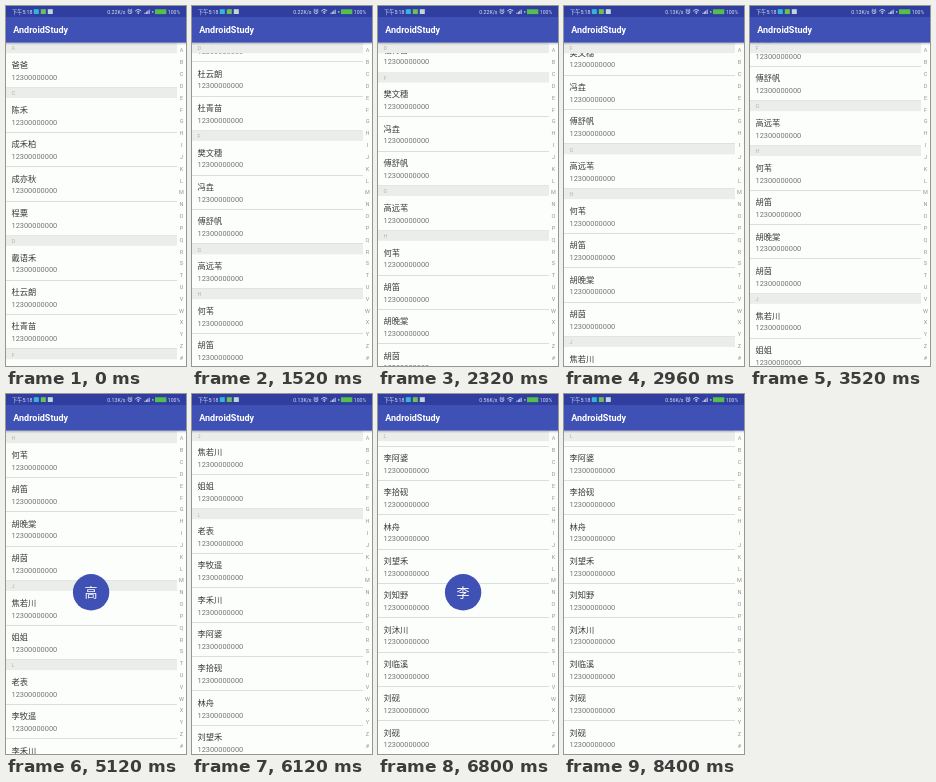
These frames come from a looping animation (180 px wide and 360 px high, 8.96 s). An HTML page with a canvas:

```html
<!DOCTYPE html>
<html lang="zh-CN">
<head>
<meta charset="utf-8">
<title>AndroidStudy</title>
<style>
html, body { margin: 0; width: 100%; height: 100%; overflow: hidden; background: #fcfefb; }
canvas { display: block; width: 180px; height: 360px; }
</style>
</head>
<body>
<canvas id="stage"></canvas>
<script>
const W = 180, H = 360, LOOP = 8960, STEP = 40;
const STATUS_H = 11, TOP = 36.67, LIST_W = 171;
const ROW_H = 34.333, HEAD_H = 10.5;
const FONT = 'Roboto, "Noto Sans CJK SC", "Noto Sans CJK", sans-serif';
const PHONE = '12300000000';
const BLUE = '#3f51b5', PAPER = '#fcfefb';

const GROUPS = {
  A: '爸爸',
  C: '陈禾 成禾柏 成亦秋 程粟',
  D: '戴语禾 杜云朗 杜青苗',
  F: '樊文穗 冯垚 傅舒帆',
  G: '高远苇',
  H: '何苇 胡笛 胡晚棠 胡茵',
  J: '焦若川 姐姐',
  L: '老表 李牧遥 李禾川 李阿婆 李拾砚 林舟 刘望禾 刘知野 刘沐川 刘临溪 刘砚 刘砚'
};

// [time, scroll offset]
const SCROLL = [
  [0, 0], [360, 0], [960, 155], [1360, 155], [1520, 218.5], [1920, 275],
  [2200, 275], [2960, 318.5], [4160, 410.6], [5120, 462.5], [5800, 462.5],
  [6150, 625], [6800, 789.5], [LOOP, 789.5]
];
// Spans in which the list rests and the bubble is up
const BUBBLE = [[960, 1360], [1920, 2200], [5120, 5800], [6800, 7840]];

const canvas = document.getElementById('stage');
const ctx = canvas.getContext('2d');
const dpr = window.devicePixelRatio || 1;
canvas.width = W * dpr;
canvas.height = H * dpr;

const heads = [], rows = [];
let end = 0;
for (const [letter, names] of Object.entries(GROUPS)) {
  heads.push({ letter, y: end });
  end += HEAD_H;
  for (const name of names.split(' ')) {
    rows.push({ name, y: end });
    end += ROW_H;
  }
}

function slope(i) {
  const a = SCROLL[i - 1], b = SCROLL[i], c = SCROLL[i + 1];
  if (!a || !c || a[1] === b[1] || b[1] === c[1]) return 0;
  return (c[1] - a[1]) / (c[0] - a[0]);
}

function scrollAt(t) {
  let i = 0;
  while (i < SCROLL.length - 2 && t >= SCROLL[i + 1][0]) i++;
  const [t0, s0] = SCROLL[i], [t1, s1] = SCROLL[i + 1];
  const d = t1 - t0, u = (t - t0) / d, v = 1 - u;
  return s0 * (1 + 2 * u) * v * v + s1 * u * u * (3 - 2 * u)
    + d * u * v * (slope(i) * v - slope(i + 1) * u);
}

function rect(x, y, w, h, color) {
  ctx.fillStyle = color;
  ctx.fillRect(x, y, w, h);
}

function disc(x, y, r, color) {
  ctx.fillStyle = color;
  ctx.beginPath();
  ctx.arc(x, y, r, 0, 7);
  ctx.fill();
}

function text(str, x, y, size, color, align = 'left', weight = 400) {
  ctx.font = `${weight} ${size}px ${FONT}`;
  ctx.textAlign = align;
  ctx.fillStyle = color;
  ctx.fillText(str, x, y);
}

function drawHead(letter, y) {
  rect(0, y, LIST_W, HEAD_H, '#ebedea');
  text(letter, 5.5, y + 7.8, 5.5, '#b4b4b4');
}

function drawList(s) {
  ctx.save();
  ctx.beginPath();
  ctx.rect(0, TOP, LIST_W, H - TOP);
  ctx.clip();
  for (const { name, y } of rows) {
    const top = TOP + y - s;
    if (top > H || top + ROW_H < TOP) continue;
    text(name, 5.5, top + 14.9, 8.25, '#3a3a3a');
    text(PHONE, 5.5, top + 26.6, 7.4, '#747474');
    rect(0, Math.floor(top + ROW_H), LIST_W, 1, '#dcdedb');
  }
  for (const h of heads) {
    const top = TOP + h.y - s;
    if (top < H && top > TOP - HEAD_H) drawHead(h.letter, top);
  }
  // Pinned header, pushed up by the next one
  let k = 0;
  while (heads[k + 1] && heads[k + 1].y <= s) k++;
  const next = heads[k + 1] ? heads[k + 1].y - s : HEAD_H;
  drawHead(heads[k].letter, TOP + Math.min(0, next - HEAD_H));
  ctx.restore();
}

function drawIndex() {
  rect(LIST_W, TOP, W - LIST_W, H - TOP, PAPER);
  [...'ABCDEFGHIJKLMNOPQRSTUVWXYZ#'].forEach((c, i) =>
    text(c, 175.5, 46.4 + i * 11.83, 5.5, '#949494', 'center'));
}

function drawStatus(t) {
  const light = '#d9def2';
  rect(0, 0, W, STATUS_H, '#303f9f');
  text('下午5:18', 6, 7.6, 5.2, light);
  rect(27.8, 3.2, 5, 4.8, '#35b5dc');
  rect(34.8, 3.2, 5, 4.8, '#6fbf57');
  rect(41.8, 3.2, 5, 4.8, '#c3d4dc');

  const rate = t < 2400 ? '0.22' : t < 6400 ? '0.13' : '0.56';
  text(rate + 'K/s', 119.5, 7.6, 5.2, light, 'right');

  ctx.strokeStyle = light;
  ctx.lineWidth = 0.7;
  ctx.beginPath();
  ctx.arc(124, 5.8, 1.9, 0, 7);
  ctx.moveTo(124, 4.6);
  ctx.lineTo(124, 6);
  ctx.lineTo(125, 6);
  ctx.moveTo(121.7, 3.9);
  ctx.lineTo(122.8, 3.1);
  ctx.moveTo(125.2, 3.1);
  ctx.lineTo(126.3, 3.9);
  ctx.stroke();

  ctx.lineWidth = 0.9;
  for (const r of [2, 4]) {
    ctx.beginPath();
    ctx.arc(132.3, 7.6, r, -Math.PI * 0.78, -Math.PI * 0.22);
    ctx.stroke();
  }
  disc(132.3, 7.3, 0.7, light);

  for (let i = 0; i < 4; i++) rect(138.5 + i * 1.4, 6.7 - i, 0.9, 1.3 + i, light);
  rect(146.2, 5.2, 1.2, 1.4, light);
  rect(149, 3.3, 11.3, 4.8, '#54c04a');
  text('100%', 161.8, 7.6, 5.1, light);
}

function drawBar() {
  const shade = ctx.createLinearGradient(0, TOP, 0, TOP + 2.5);
  shade.addColorStop(0, 'rgba(0,0,0,.22)');
  shade.addColorStop(1, 'rgba(0,0,0,0)');
  rect(0, TOP, W, 2.5, shade);
  rect(0, STATUS_H, W, TOP - STATUS_H, BLUE);
  text('AndroidStudy', 7.2, 27.2, 9, '#fff', 'left', 700);
}

function drawBubble(s) {
  const first = rows.find(r => r.y + ROW_H > s);
  disc(85.1, 198.3, 18.2, BLUE);
  text(first.name[0], 85.1, 203.2, 13, '#fff', 'center');
}

function draw(now) {
  const t = Math.floor((now % LOOP) / STEP) * STEP;
  const s = scrollAt(t);
  ctx.setTransform(dpr, 0, 0, dpr, 0, 0);
  rect(0, 0, W, H, PAPER);
  drawList(s);
  drawIndex();
  drawBar();
  drawStatus(t);
  if (BUBBLE.some(([a, b]) => t >= a && t < b)) drawBubble(s);
}

const start = performance.now();
function tick() {
  draw(performance.now() - start);
  requestAnimationFrame(tick);
}
tick();
</script>
</body>
</html>
```
